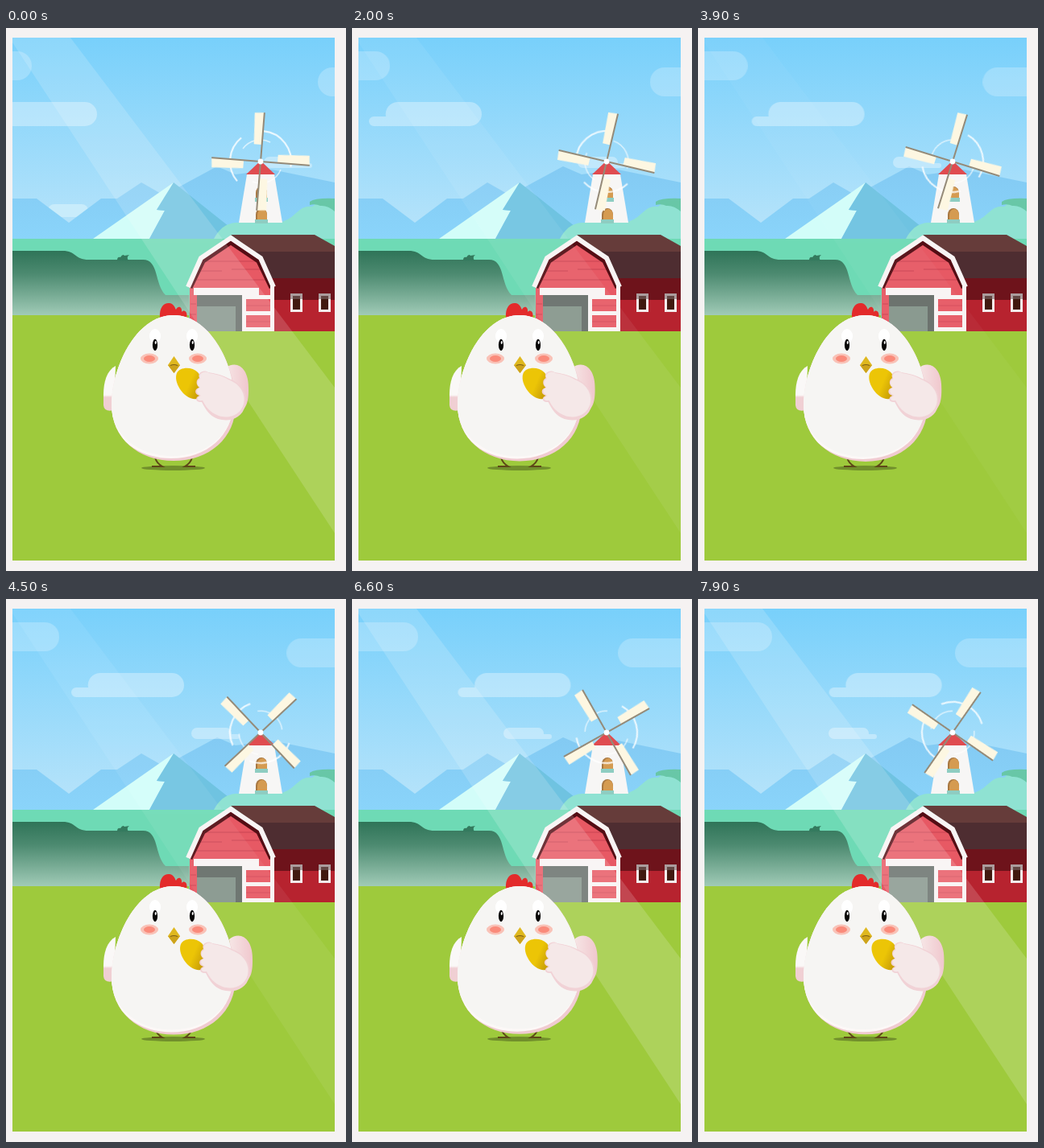
An HTML page that plays this animation: 422x675 px, repeating every 8 s.

```html
<!DOCTYPE html>
<html lang="en">
<head>
<meta charset="utf-8">
<title>Farm chicken</title>
<style>
html, body { margin: 0; width: 100%; height: 100%; overflow: hidden; background: #f5f2f2; }
svg { display: block; width: 422px; height: 675px; }
.drift, .spin, #beam { animation: drift 8s linear infinite; }
@keyframes drift { to { transform: translateX(var(--dx)); } }
.spin { animation-name: spin; }
@keyframes spin { from { transform: rotate(var(--from)); } to { transform: rotate(var(--to)); } }
#beam { animation-name: beam; }
@keyframes beam {
  0% { opacity: 1; } 12% { opacity: .5; } 24% { opacity: .45; } 36% { opacity: .1; }
  42% { opacity: .1; } 56% { opacity: .4; } 67.5% { opacity: .75; } 80%, 100% { opacity: 1; }
}
#wisp { animation: wisp 8s linear infinite; }
@keyframes wisp { 12%, 100% { opacity: 0; transform: translateX(-20px); } }
</style>
</head>
<body>
<svg viewBox="0 0 422 675">
  <defs>
    <clipPath id="stage"><path d="M8 12h400v650H8z"/></clipPath>
    <linearGradient id="sky" x2="0" y2="1">
      <stop stop-color="#78d0fb"/><stop offset="1" stop-color="#b9e4fa"/>
    </linearGradient>
    <linearGradient id="range" x2="0" y2="1">
      <stop stop-color="#83caf3"/><stop offset="1" stop-color="#8ad4fa"/>
    </linearGradient>
    <linearGradient id="bluff" x2="0" y2="1">
      <stop stop-color="#2f7458"/><stop offset=".35" stop-color="#4c8a70"/><stop offset="1" stop-color="#a2ccb8"/>
    </linearGradient>
    <linearGradient id="side" x2="0" y2="1">
      <stop offset=".65" stop-color="#faf8f7"/><stop offset=".7" stop-color="#f0cfd3"/>
    </linearGradient>
    <linearGradient id="back">
      <stop stop-color="#f6e6e6"/><stop offset="1" stop-color="#f0c7cd"/>
    </linearGradient>
    <linearGradient id="gold" x2="1" y2=".5">
      <stop offset=".6" stop-color="#ecc506"/><stop offset="1" stop-color="#c99f08"/>
    </linearGradient>
    <path id="egg" d="M208 357C160 357 131 424 131 468C131 510 164 538 208 538S285 510 285 468C285 424 256 357 208 357Z"/>
    <clipPath id="inEgg"><use href="#egg"/></clipPath>
    <g id="blade">
      <path d="M21-10L60-12L61 0H21Z" fill="#fdf7e2"/>
      <path d="M0 0H61" stroke="#948a78" stroke-width="2"/>
    </g>
    <g id="window">
      <path d="M310 215v-10a7 8 0 0 1 14 0v10z" fill="#a87842"/>
      <path d="M312 215v-9a6 8 0 0 1 12 0v9z" fill="#d59b51"/>
      <path d="M309 211h16v5h-16z" fill="#8ecdc2"/>
    </g>
    <g id="pane">
      <path d="M353 330h15v23h-15z" fill="#f5eeee"/>
      <path d="M356 333h9v17h-9z" fill="#41190f"/>
      <path d="M353 330h15v7h-15z" fill="#7a6668" opacity=".6"/>
    </g>
    <g id="eye">
      <ellipse cx="185" cy="383" rx="7" ry="9" fill="#fff"/>
      <ellipse cx="185" cy="394" rx="3.1" ry="7.2" fill="#080606"/>
      <ellipse cx="185.7" cy="391" rx="1" ry="2" fill="#fff"/>
    </g>
    <g id="cheek">
      <ellipse cx="178" cy="411" rx="11" ry="6.5" fill="#f9c2b7"/>
      <ellipse cx="178" cy="411" rx="7" ry="4" fill="#fa8b7b"/>
    </g>
  </defs>

  <g clip-path="url(#stage)">
    <path d="M8 12h400v250H8z" fill="url(#sky)"/>
    <rect id="wisp" x="52" y="219" width="50" height="16" rx="8" fill="#d3f1fb" opacity=".7"/>
    <path d="M8 212H38L78 242L118 212H138L168 192L196 208L225 192L262 172L285 182L330 176L408 192V262H8Z" fill="url(#range)"/>
    <path d="M208 192L108 262H178L197 227L187 226Z" fill="#d2fdf9"/>
    <path d="M208 192L187 226L197 227L178 262H296Z" fill="#6fc3e1"/>

    <g fill="#fff">
      <rect class="drift" style="--dx:60.8px" x="-88" y="29" width="120" height="36" rx="18" opacity=".23"/>
      <rect class="drift" style="--dx:-68.8px" x="387" y="49" width="130" height="36" rx="18" opacity=".23"/>
      <path class="drift" style="--dx:192px" opacity=".34" d="M8 92H98a15 15 0 0 1 0 30H-21a6 6 0 0 1 0-12H-6A15 15 0 0 1 8 92Z"/>
      <path class="drift" style="--dx:-160px" opacity=".34" d="M327 160h36a7 7 0 0 1 7 8h7a3 3 0 0 1 0 6H327a7 7 0 0 1 0-14Z"/>
    </g>

    <path d="M8 262h400v100H8z" fill="#6edab5"/>
    <path d="M258 262Q268 243 285 242H338Q350 240 360 230Q370 220 380 222Q388 214 408 216V262Z" fill="#8fe2d2"/>
    <path d="M377 216Q384 211 408 212V228Q399 220 390 221Q384 218 377 220Z" fill="#68c7a7"/>
    <path d="M196 332h40v26h-40z" fill="#8ac4aa"/>
    <path d="M8 277H70C88 277 84 288 103 288H170C190 288 184 318 198 332H227V358H8Z" fill="url(#bluff)"/>
    <path d="M138 289Q138 284 142 285Q145 280 147 283L153 282Q149 285 152 289Z" fill="#347a5e"/>
    <path d="M8 357H227V377H408V662H8Z" fill="#9eca3c"/>

    <path d="M299 182H333L343 242H289Z" fill="#f7f6f5"/>
    <path d="M316 165L334 182H298Z" fill="#df4c50"/>
    <use href="#window"/>
    <use href="#window" y="27"/>
    <g transform="translate(316 166)">
      <g class="spin" style="--from:0deg;--to:1066.7deg" fill="none" stroke="#fff" stroke-opacity=".8">
        <path d="M3.3-37.9A38 38 0 0 1 37.4 6.6M-29 24.4A38 38 0 0 1-24-29.5" stroke-width="2.2"/>
        <path d="M-22-16A27 27 0 0 1 12-24M25 10A27 27 0 0 1-10 25" stroke-width="1.5" stroke-opacity=".65"/>
      </g>
      <g class="spin" style="--from:4.5deg;--to:399.7deg">
        <use href="#blade"/>
        <use href="#blade" transform="rotate(90)"/>
        <use href="#blade" transform="rotate(180)"/>
        <use href="#blade" transform="rotate(270)"/>
      </g>
      <circle r="3.4" fill="#fff"/>
    </g>

    <g id="barn">
      <path d="M279 257H383L408 271V280H310Z" fill="#663c3a"/>
      <path d="M308 278H408V314H325Z" fill="#4e2d31"/>
      <path d="M325 311H408V377H325Z" fill="#b7232f"/>
      <path d="M325 311H408V338H325Z" fill="#6e131b"/>
      <use href="#pane"/>
      <use href="#pane" x="35"/>
      <path d="M228 377V322L244 287L279 263L314 287L332 322V377Z" fill="#e75964"/>
      <path d="M247 290H310M239 302H268M280 300H318M235 313H322M229 343H236M229 356H236M229 367H236" stroke="#d44b58" stroke-width="1.4"/>
      <path d="M229 323L245 290L279 267L313 290L329 323" fill="none" stroke="#540d14" stroke-width="5"/>
      <path d="M226 322L242 286L279 261L316 286L332 322" fill="none" stroke="#f8f4f4" stroke-width="6"/>
      <path d="M233 323h81v9h-81zM293 332h40v45h-40zM328 320h5v57h-5z" fill="#f8f4f4"/>
      <path d="M237 332h56v45h-56z" fill="#666e69"/>
      <path d="M237 346h48v31h-48z" fill="#86968c"/>
      <path d="M298 337h30v15h-30zM298 357h30v15h-30z" fill="#e75964"/>
      <path d="M298 345h30M298 365h30" stroke="#d44b58"/>
    </g>

    <path id="beam" d="M8 12H80L408 447V628L8 18Z" fill="#fff" fill-opacity=".16"/>

    <ellipse cx="207.500" cy="547" rx="39.500" ry="3" fill="#718f2c"/>
    <path d="M185 534Q187 541 194 545H181M231 534Q229 541 222 545H235" fill="none" stroke="#5e4818" stroke-width="2"/>
    <path d="M136 420C125 426 121 440 121 456V469Q122 478 134 475Z" fill="url(#side)"/>
    <path d="M191 360C190 346 197 341 203 342C209 343 210 349 211 350C214 344 219 347 218 353C222 349 226 354 224 361Z" fill="#e32b2b"/>

    <g id="wing">
      <path d="M272 423C286 412 302 422 301 450C301 470 296 478 280 480Z" fill="url(#back)"/>
    </g>
    <g id="body">
      <use href="#egg" fill="#f0cbd0"/>
      <g clip-path="url(#inEgg)">
        <use href="#egg" x="-3" y="-3" fill="#fcf8f7"/>
        <use href="#egg" x="-2" y="-6" fill="#f6f5f3"/>
      </g>
    </g>
    <use href="#eye"/>
    <use href="#eye" x="46"/>
    <use href="#cheek"/>
    <use href="#cheek" x="60"/>
    <path d="M208.500 408L216 419L208.500 429L201 419Z" fill="#dfb81f"/>
    <path d="M201 419H216L208.500 429Z" fill="#cda31b"/>
    <path d="M204 419.500Q208.500 417.500 213 419.500" fill="none" stroke="#7d5e14" stroke-width="1.200"/>

    <g id="hand">
      <path d="M212 429C216 421 231 421 238 428C246 437 245 453 240 460C232 464 222 458 216 449C211 441 210 434 212 429Z" fill="url(#gold)"/>
      <path id="palm" d="M240 435C237 429 245 424 251 428C258 429 268 431 277 436C291 441 300 453 297 469C293 486 277 490 263 486C252 482 247 473 243 465C235 466 234 459 240 457C233 455 234 448 240 447C235 443 236 437 240 435Z" fill="#f1d2d6"/>
      <path d="M241 436C238 430 246 425 252 429C259 430 268 432 276 437C289 442 298 453 295 467C291 482 276 486 264 482C253 478 248 471 244 463C236 464 236 459 242 457C235 454 236 448 241 447C236 443 237 438 241 436Z" fill="#f5e8e8"/>
    </g>
  </g>
</svg>
<script>
const [wing, body, hand] = ["wing", "body", "hand"].map(id => document.getElementById(id));
const LOOP = 8000, BREATH = 1800;
const start = performance.now();

function draw(now) {
  const t = Math.max(0, now - start) % LOOP;
  const air = 0.5 - 0.5 * Math.cos(2 * Math.PI * t / BREATH);
  const shift = `translate(${5 * air} 0)`;
  wing.setAttribute("transform", shift);
  hand.setAttribute("transform", shift);
  body.setAttribute("transform", `translate(0 357) scale(1 ${1 + 0.02 * air}) translate(0 -357)`);
  requestAnimationFrame(draw);
}
draw(start);
</script>
</body>
</html>
```
